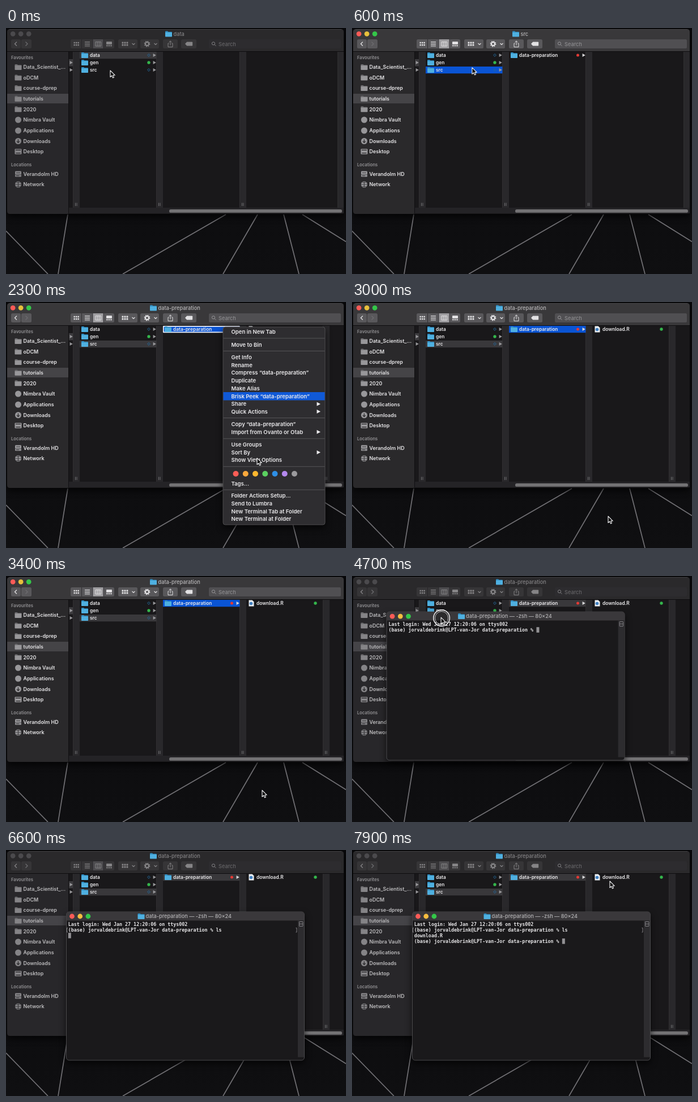
An HTML page that plays this animation: 600x434 px, repeating every 8000 ms.

```html
<!DOCTYPE html>
<html lang="en">
<head>
<meta charset="utf-8">
<title>Open a terminal at a folder</title>
<style>
html, body { margin: 0; width: 100%; height: 100%; overflow: hidden; background: #0b0b0c; }
svg { display: block; width: 600px; height: 434px; }
text { font-family: Inter, "Open Sans", sans-serif; font-weight: 600; white-space: pre; }
.mono { font: bold 8.34px "DejaVu Sans Mono", "Liberation Mono", monospace; fill: #e6e5e7; }
#finder { --bar: #39383a; --side: #2a292b; --btn: #59585b; --field: #504f52; --hint: #8d8c8f; --glyph: #e2e1e3; --title: #b9b8ba; --label: #e6e5e7; --icon: #98979a; --sel: #454447; --on: #9f9ea1; }
#finder.idle { --bar: #2a292b; --side: #28272a; --btn: #363537; --field: #2d2c2f; --hint: #656467; --glyph: #858486; --title: #838284; --label: #bdbcbe; --icon: #858487; --sel: #454448; --on: #4d4c4f; }
</style>
</head>
<body>
<svg id="stage" viewBox="0 0 600 434" xmlns="http://www.w3.org/2000/svg">
  <defs>
    <linearGradient id="night" x1="0" y1="0" x2="0" y2="1">
      <stop offset="0" stop-color="#08080a"/><stop offset="1" stop-color="#0f0f11"/>
    </linearGradient>
    <filter id="shade" x="-10%" y="-10%" width="120%" height="125%" color-interpolation-filters="sRGB">
      <feDropShadow dx="0" dy="5" stdDeviation="6" flood-color="#000" flood-opacity=".7"/>
    </filter>
  </defs>
</svg>
<script>
const LOOP = 8000;
const NS = "http://www.w3.org/2000/svg";
const stage = document.getElementById("stage");

function add(parent, tag, attrs = {}) {
  const el = document.createElementNS(NS, tag);
  for (const k in attrs) el.setAttribute(k, attrs[k]);
  return parent.appendChild(el);
}
const group = (p, attrs) => add(p, "g", attrs);
const box = (p, x, y, width, height, fill, rx = 0, more = {}) =>
  add(p, "rect", { x, y, width, height, fill, rx, ...more });
const dot = (p, cx, cy, r, fill, more = {}) => add(p, "circle", { cx, cy, r, fill, ...more });
const path = (p, d, fill, more = {}) => add(p, "path", { d, fill, ...more });
const line = (p, d, stroke, width = 1) => path(p, d, "none", { stroke, "stroke-width": width });
function label(p, x, y, str, size, fill, weight = 600) {
  const t = add(p, "text", { x, y: y + size * 0.36, "font-size": size, fill });
  t.style.fontWeight = weight;
  t.textContent = str;
  return t;
}
function folder(p, x, y, fill = "#4fb0e0", lip = "#2f8dc2") {
  path(p, `M${x} ${y - 4}q0-1 1-1h3.2l1.2 1.3h5.6q1 0 1 1v1H${x}z`, lip);
  box(p, x, y - 2.8, 12, 7.8, fill, 0.8);
}
const triangle = (p, x, y, fill = "#99989b") => path(p, `M${x - 2.4} ${y - 2.9}l5.2 2.9l-5.2 2.9z`, fill);
const diamond = (p, x, y) => line(p, `M${x} ${y - 2.4}l2.4 2.4l-2.4 2.4l-2.4-2.4z`, "#22699c", 1);
const show = (el, on) => el.setAttribute("visibility", on ? "inherit" : "hidden");

// Wallpaper
box(stage, 0, 0, 600, 434, "url(#night)");
line(stage, "M0 358L74 434M109 329L92 434M388 329L206 434M444 329L383 434M490 329L517 434M523 329L600 377", "#717074", 1.7);

// File browser
const finder = group(stage, { id: "finder" });
const body = group(finder, { filter: "url(#shade)" });
box(body, 2, 2, 594, 326, "#19181a", 5);
path(finder, "M2 41V7q0-5 5-5H591q5 0 5 5V41z", "var(--bar)");
path(finder, "M2 41H110V328H7q-5 0-5-5z", "var(--side)");
line(finder, "M2 41.5H596", "#0d0c0e");
line(finder, "M110.5 42V327", "#111012");
line(finder, "M6 2.5H592", "#5a595b", 0.6);
const lights = ["#fc5b57", "#e6bf3c", "#34c749"].map((c, i) => [dot(finder, 12.2 + 14 * i, 10.3, 4.35, c), c]);

const titles = ["data", "src", "data-preparation"].map((name, i) => {
  const g = group(finder);
  const x = [281, 283, 254][i];
  folder(g, x, 10.5);
  label(g, x + 14.5, 10.5, name, 9.2, "var(--title)", 500);
  return g;
});

// Toolbar
const button = (x, w) => box(finder, x, 20, w, 16, "var(--btn)", 2.5);
const ink = (d, w = 1.2) => line(finder, d, "var(--glyph)", w);
const chip = (x, y, w, h, r = 0.4) => box(finder, x, y, w, h, "var(--glyph)", r);
[[9, 17], [27, 18], [114, 77], [198, 34], [237, 33], [277, 26], [309, 27]].forEach(b => button(...b));
box(finder, 153, 20, 19, 16, "var(--on)");
line(finder, "M133.5 20V36M153 20V36M172 20V36", "#242326", 0.8);
ink("M19 24.5l-3.5 3.5l3.5 3.5", 1.3);
line(finder, "M34.5 24.5l3.5 3.5l-3.5 3.5", "#6e6d70", 1.3);
for (let i = 0; i < 6; i++) {
  chip(119.5 + (i % 3) * 3.5, 24.7 + (i > 2) * 4, 2.4, 2.6);
  chip(204.5 + (i % 3) * 4, 24.4 + (i > 2) * 4.2, 2.9, 3);
}
ink("M139 24.5H148M139 27H148M139 29.5H148M139 32H148", 1);
ink("M158 24.5H167.5V32H158zM161.2 24.5V32M164.4 24.5V32", 1);
chip(177, 24, 10, 5);
[177, 180.6, 184.2].forEach(x => chip(x, 30.3, 2.7, 2));
ink("M222.5 27l2.5 2.5l2.5-2.5M261.5 27l2.5 2.5l2.5-2.5", 1.2);
dot(finder, 249, 28, 3.1, "none", { stroke: "var(--glyph)", "stroke-width": 2.2 });
dot(finder, 249, 28, 4.7, "none", { stroke: "var(--glyph)", "stroke-width": 1.4, "stroke-dasharray": "1.8 1.89" });
ink("M287.5 27H286V33.5H294V27H292.5M290 30.5V23M287.7 25L290 22.8L292.3 25", 1);
path(finder, "M316 28l3.2-3.5h9q1 0 1 1v5q0 1-1 1h-9z", "var(--glyph)");
box(finder, 358, 20, 233, 16, "var(--field)", 2.5);
dot(finder, 366, 27.3, 2.6, "none", { stroke: "var(--icon)", "stroke-width": 1 });
line(finder, "M368 29.3l2.5 2.5", "var(--icon)", 1);
label(finder, 375, 28.3, "Search", 9.2, "var(--hint)", 500);

// Sidebar
label(finder, 9, 52.5, "Favourites", 7.7, "#929194");
label(finder, 9, 241.5, "Locations", 7.7, "#929194");
box(finder, 2, 116, 108, 17, "var(--sel)");
const cut = (d, w = 1.1) => line(finder, d, "var(--side)", w);
const icons = {
  folder: y => folder(finder, 15.5, y, "var(--icon)", "#6d6c6f"),
  round: y => dot(finder, 21.5, y, 5.5, "var(--icon)"),
  down(y) { this.round(y); cut(`M21.5 ${y - 3}v5.6M19 ${y + 0.4}l2.5 2.5l2.5-2.5`, 1.3); },
  desk(y) { box(finder, 15.5, y - 4.8, 12, 9.6, "var(--icon)", 1.3); cut(`M17 ${y - 2.6}h9M17.5 ${y + 2.7}h8`, 1.2); },
  disk(y) { box(finder, 16, y - 5, 11, 10, "var(--icon)", 1.3); cut(`M16 ${y + 1.5}h11M18 ${y + 3.3}h5M18 ${y - 2}h7`, 0.8); },
  globe(y) { this.round(y); cut(`M16 ${y}h11M21.5 ${y - 5.5}v11M18 ${y - 4}q3.5 2 7 0M18 ${y + 4}q3.5-2 7 0`, 0.8); }
};
[["Data_Scientist_...", 69, "folder"], ["oDCM", 87.5, "folder"], ["course-dprep", 106, "folder"],
 ["tutorials", 124.8, "folder"], ["2020", 143.3, "folder"], ["Nimbra Vault", 162, "round"],
 ["Applications", 181, "round"], ["Downloads", 199.5, "down"], ["Desktop", 218, "desk"],
 ["Verandolm HD", 257.5, "disk"], ["Network", 276, "globe"]].forEach(([name, y, icon]) => {
  icons[icon](y);
  label(finder, 30.5, y, name, 8.95, "var(--label)");
});

// Columns
const strip = (p, x, w = 12) => {
  box(p, x, 42, w, 275, "#29282b");
  line(p, `M${x + 0.4} 42V317`, "#353437", 0.7);
  if (w > 11) line(p, `M${x + 4.5} 308.5v5.5M${x + 7} 308.5v5.5`, "#777679", 0.9);
};
[118, 265, 412].forEach(x => strip(finder, x));
const farWide = group(finder), farOpen = group(finder);
strip(farWide, 585, 11);
strip(farOpen, 559);
box(finder, 111, 317, 485, 10, "#242326");
box(finder, 288, 320, 305, 5.8, "#737274", 2.9);
box(finder, 111, 55, 7, 12.5, "#3c3b3e");
triangle(finder, 115, 61);
triangle(finder, 115, 74);

const rowMark = (x, y) => box(finder, x, y - 6, 135.5, 12.2, "#39383b");
const marks = { data: rowMark(130, 48), src: rowMark(130, 74), prep: rowMark(277, 48) };
const ring = box(finder, 277.8, 42.8, 134, 10.6, "none", 0.5, { stroke: "#f2f2f4", "stroke-width": 1.7 });
function item(p, x, y, name) {
  folder(p, x, y);
  label(p, x + 15, y, name, 8.35, "#ecebed");
}
["data", "gen", "src"].forEach((name, i) => {
  const y = 48 + 13 * i;
  item(finder, 133, y, name);
  if (i === 1) dot(finder, 252, y, 2.7, "#34b64c");
  else diamond(finder, 252, y);
  triangle(finder, 262, y);
});
const prep = group(finder);
item(prep, 280, 48, "data-preparation");
dot(prep, 398.5, 48, 2.5, "#e23a35");
triangle(prep, 409, 48, "#d8d7d9");
const script = group(finder);
path(script, "M428.5 42.5h6l3 3v8h-9z", "#e9edf1");
dot(script, 432.5, 48.5, 2.8, "#3f7fc0");
label(script, 442, 48, "download.R", 8.35, "#ecebed");
dot(script, 546, 48, 2.7, "#34b64c");

// Context menu
const menu = group(stage);
box(menu, 383, 44, 180, 349, "#2e2d30", 4, { stroke: "#58575a", "stroke-width": 0.8, filter: "url(#shade)" });
const hilite = box(menu, 383.5, 0, 179, 14.4, "#1059d6");
const entries = [
  ["Open in New Tab", 53], ["Move to Bin", 75.3], ["Get Info", 97.5], ["Rename", 111.2],
  ["Compress “data-preparation”", 125], ["Duplicate", 138.7], ["Make Alias", 152.5],
  ["Brisk Peek “data-preparation”", 166.2], ["Share", 180], ["Quick Actions", 193.3],
  ["Copy “data-preparation”", 215.5], ["Import from Ovanto or Otab", 229.2], ["Use Groups", 251.7],
  ["Sort By", 265.3], ["Show View Options", 279], ["Tags...", 320.5], ["Folder Actions Setup...", 342],
  ["Send to Lumbra", 355.7], ["New Terminal Tab at Folder", 369.4], ["New Terminal at Folder", 383]
];
entries.forEach(([name, y]) => label(menu, 397.5, y, name, 9.55, "#ecebed"));
[180, 193.3, 229.2, 265.3].forEach(y => path(menu, `M548.5 ${y - 3.5}l6.5 3.5l-6.5 3.5z`, "#ecebed"));
[64, 86.5, 204.5, 241, 290.3, 331.3].forEach(y => line(menu, `M383.5 ${y}H562.5`, "#555457", 1));
["#fc5d56", "#f8a83c", "#fdb72f", "#5bd160", "#2e8fe6", "#b488ee", "#9b9a9d"]
  .forEach((c, i) => dot(menu, 405.5 + 17.25 * i, 303, 5, c));

// Terminal, drawn from its own corner
const term = group(stage);
box(term, 0, 0, 420, 262, "#1a191b", 5, { stroke: "#5a595c", "stroke-width": 0.8, filter: "url(#shade)" });
path(term, "M0 15.5V5q0-5 5-5H415q5 0 5 5V15.5z", "#3a383b");
box(term, 408.5, 15.5, 11, 241, "#2d2c2f");
box(term, 411, 17.5, 6.5, 8, "none", 0.5, { stroke: "#8b8a8d", "stroke-width": 0.9 });
line(term, "M411 21.5h6.5", "#8b8a8d", 0.9);
["#fc5b57", "#f5bd3f", "#34c749"].forEach((c, i) => dot(term, 10 + 14.2 * i, 8, 4.4, c));
folder(term, 126, 8);
label(term, 140, 8, "data-preparation — -zsh — 80×24", 9.2, "#b5b4b6", 500);
const PROMPT = "(base) jorvaldebrink@LPT-van-Jor data-preparation % ";
const CHAR = 5.02;
const lineY = i => 22 + 10 * i;
const mono = (i, str) => {
  const t = add(term, "text", { class: "mono", x: 3.3, y: lineY(i) + 3 });
  t.textContent = str;
  return t;
};
mono(0, "Last login: Wed Jan 27 12:20:06 on ttys002");
const typed = mono(1, PROMPT);
const output = group(term);
output.append(mono(2, "download.R"), mono(3, PROMPT));
const brackets = group(term);
line(brackets, "M2.5 28.5h-1.5v7.5h1.5M405 28.5h1.5v7.5h-1.5", "#8f8e91", 0.9);
const caret = box(term, 0, 0, 5, 9.6, "#929194");

// Pointer
const pointer = group(stage);
const press = group(pointer);
dot(press, 1, 1, 14.3, "#000", { "fill-opacity": 0.25, stroke: "#f1f1f3", "stroke-width": 1.5 });
dot(press, 1, 1, 11.6, "none", { stroke: "#d6d6d8", "stroke-width": 0.9 });
path(pointer, "M0 0V11.5L2.7 9L4.5 13L6.5 12.1L4.8 8.3H8.3z", "#0a0a0a",
  { stroke: "#f4f4f6", "stroke-width": 1.1, "stroke-linejoin": "round" });

// time, x, y
const POINTER = [
  [0, 184, 75], [500, 184, 75], [1100, 350, 44], [1550, 350, 44], [1750, 383, 44], [2000, 383, 44],
  [2300, 443, 275], [2650, 452, 378], [3900, 452, 378], [4500, 146, 62], [4600, 146, 62],
  [5100, 201, 117], [5200, 202.5, 119], [7100, 202.5, 119], [7700, 455, 55], [LOOP, 455, 55]
];
const WINDOW = [[0, 50, 52], [4600, 50, 52], [5100, 105, 107], [5200, 106.5, 109], [LOOP, 106.5, 109]];
const PRESSES = [[400, 500], [1150, 1270], [2900, 3000], [4550, 5250]];

function at(track, t) {
  const i = Math.max(1, track.findIndex(k => k[0] > t));
  const [a, b] = [track[i - 1], track[i]];
  const p = (t - a[0]) / (b[0] - a[0]);
  return [a[1] + (b[1] - a[1]) * p, a[2] + (b[2] - a[2]) * p];
}
const within = (t, a, b) => t >= a && t < b;
const move = (el, [x, y]) => el.setAttribute("transform", `translate(${x} ${y})`);

function draw(t) {
  const step = t < 400 ? 0 : t < 1200 ? 1 : 2;
  const active = within(t, 400, 3800);
  finder.setAttribute("class", active ? "" : "idle");
  lights.forEach(([el, c]) => el.setAttribute("fill", active ? c : "#4b4a4d"));
  titles.forEach((el, i) => show(el, i === step));
  show(marks.data, step === 0);
  show(marks.src, step > 0);
  show(marks.prep, step === 2);
  marks.src.setAttribute("fill", step === 1 ? "#0a54d4" : "#39383b");
  marks.prep.setAttribute("fill", active ? "#0a54d4" : "#39383b");
  show(prep, step > 0);
  show(script, step === 2);
  show(farWide, step < 2);
  show(farOpen, step === 2);

  const open = within(t, 1800, 3000);
  show(menu, open);
  show(ring, open);
  // the highlight trails the pointer
  const trail = at(POINTER, Math.max(0, t - 140))[1];
  const hit = entries.find(e => Math.abs(e[1] - trail) <= 6.9);
  show(hilite, open && hit);
  if (hit) hilite.setAttribute("y", hit[1] - 7.2);

  show(term, t >= 3800);
  move(term, at(WINDOW, t));
  const keys = t < 6200 ? "" : t < 6350 ? "l" : "ls";
  const sent = t >= 6550, done = t >= 6700;
  typed.textContent = PROMPT + keys;
  show(brackets, sent);
  show(output, done);
  const row = done ? 3 : sent ? 2 : 1;
  const col = done ? PROMPT.length : sent ? 0 : PROMPT.length + keys.length;
  caret.setAttribute("x", 3.3 + col * CHAR);
  caret.setAttribute("y", lineY(row) - 4.9);

  move(pointer, at(POINTER, t));
  show(pointer, !within(t, 6100, 7100));
  show(press, PRESSES.some(([a, b]) => within(t, a, b)));
}

const start = performance.now();
function tick() {
  draw((performance.now() - start) % LOOP);
  requestAnimationFrame(tick);
}
tick();
</script>
</body>
</html>
```
